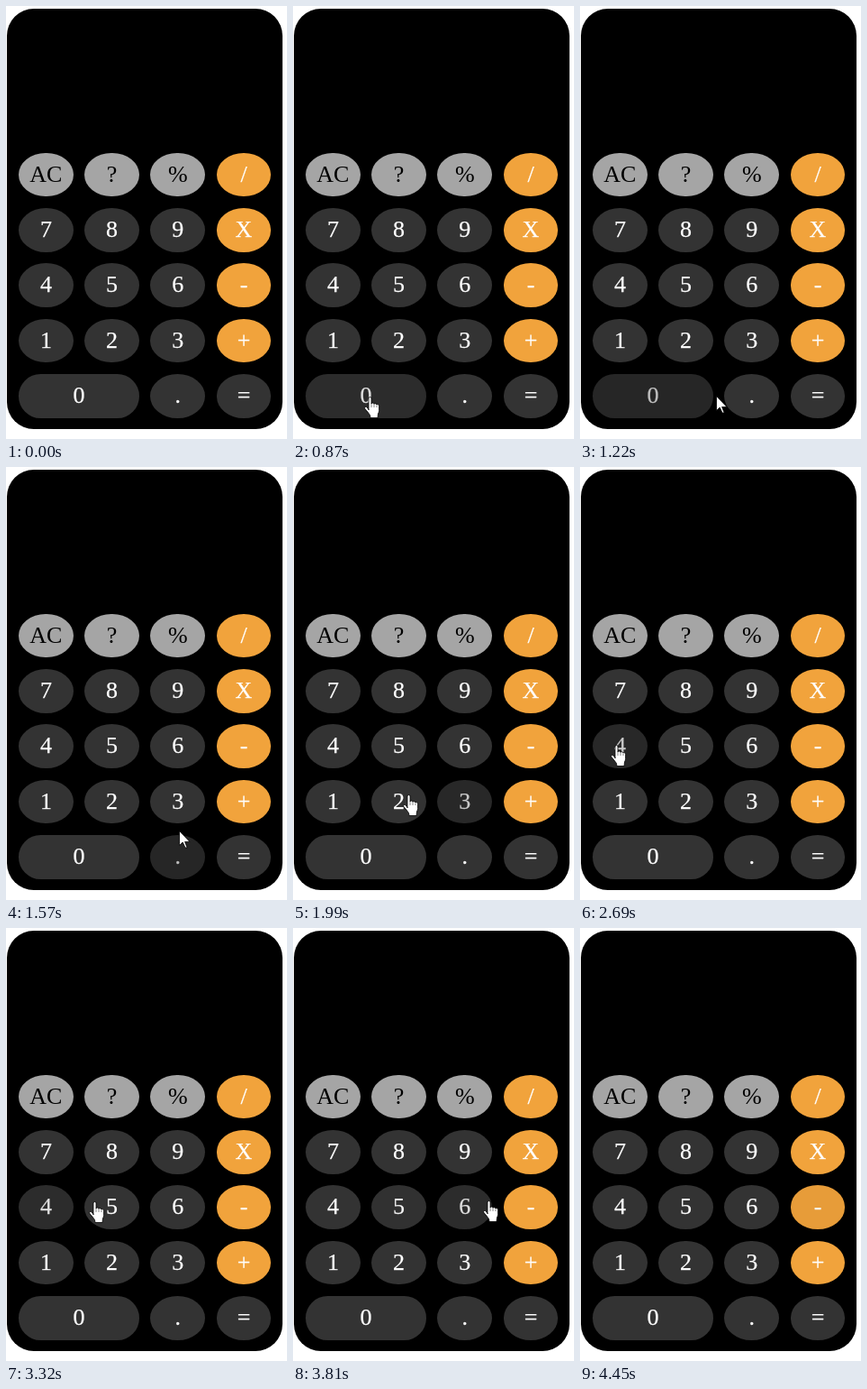
Recreate the animation shown at these times as an HTML page. Size 312 by 480 pixels, loop 4.72 s.

```html
<!DOCTYPE html>
<html lang="en">
<head>
<meta charset="utf-8">
<title>Calculator</title>
<style>
  html, body { margin: 0; width: 100%; height: 100%; overflow: hidden; background: #fff; }
  #calc {
    position: absolute; left: 1px; top: 3px; width: 306px; height: 466px;
    border-radius: 30px; background: #000;
  }
  .key {
    position: absolute; text-align: center;
    font-family: "Liberation Serif", "Times New Roman", serif; font-size: 26px;
    color: #fff; background: #333; -webkit-text-stroke: .25px;
  }
  .light { color: #000; background: #a5a5a5; -webkit-text-stroke: 0; }
  .orange { background: #f1a33c; }
  #pointer { position: absolute; left: 0; top: 0; width: 312px; height: 480px; }
  #pointer path { fill: #fff; stroke: #000; stroke-width: .8; stroke-linejoin: round; }
</style>
</head>
<body>
<div id="calc"></div>
<svg id="pointer" viewBox="0 0 312 480">
  <path id="arrow" d="M.5 .5V16.5L4.2 13L7 19H9.2L6.6 12.4H12Z"/>
  <g id="hand">
    <path d="M5 15V2Q5 .5 6.5 .5T8 2V8Q8.2 7 9.4 7T11 8.4Q11.2 7.7 12.4 7.7T14 9.2Q14.2 8.6 15.2 8.6T16.6 10.2V15.5Q16.6 17 15.5 19L15 23.5H7L6.5 20.5Q4 17 1 13.6Q0 12 1.2 11.4Q2.6 11 4 13L5 14.5Z"/>
    <path d="M8 8V12M11 9V12M14 10V12" opacity=".6"/>
  </g>
</svg>
<script>
const LOOP = 4720, START = 660, END = 4450, STEP = 70;
const FADE = 280, DIM = 0.25;
const KEY_W = 60.8, KEY_H = 48.8, PITCH_X = 73.2, PITCH_Y = 61.3;

const [calc, pointer, arrow, hand] =
  ['calc', 'pointer', 'arrow', 'hand'].map(id => document.getElementById(id));
const keys = [];

function addKey(label, col, row, span = 1) {
  const w = KEY_W + (span - 1) * PITCH_X, h = KEY_H;
  const x = 13 + col * PITCH_X, y = 159.6 + row * PITCH_Y;
  const rx = span > 1 ? h / 2 : w / 2;
  const el = document.createElement('div');
  el.className = 'key' + (col === 3 && row < 4 ? ' orange' : row === 0 ? ' light' : '');
  el.textContent = label;
  Object.assign(el.style, {
    left: x + 'px', top: y + 'px', width: w + 'px', height: h + 'px',
    lineHeight: h + 'px', borderRadius: `${rx}px / ${h / 2}px`
  });
  calc.append(el);
  keys.push({
    el, rx, ry: h / 2, flat: w / 2 - rx,
    cx: calc.offsetLeft + x + w / 2, cy: calc.offsetTop + y + h / 2
  });
}

['AC ? % /', '7 8 9 X', '4 5 6 -', '1 2 3 +'].forEach((line, row) =>
  line.split(' ').forEach((label, col) => addKey(label, col, row)));
addKey('0', 0, 4, 2);
addKey('.', 2, 4);
addKey('=', 3, 4);

// The pointer tip travels along curves, one point per step
const tips = [[107, 457]];

function glide(steps, via, to) {
  const from = tips[tips.length - 1];
  for (let n = 1; n <= steps; n++) {
    const k = n / steps, r = 1 - k;
    tips.push(from.map((v, i) => r * r * v + 2 * r * k * via[i] + k * k * to[i]));
  }
}

function rest() {
  tips.push(tips[tips.length - 1]);
}

glide(8, [49, 413], [151, 432]);
glide(8, [211, 430], [183, 360]);
glide(8, [110, 368], [45, 358]);
glide(8, [37, 298], [44, 303]);
rest();
glide(8, [88, 303], [132, 304]);
glide(8, [244, 300], [252, 305]);
glide(4, [222, 290], [222, 464]);

function hits(key, [x, y]) {
  const dx = Math.max(0, Math.abs(x - key.cx) - key.flat) / key.rx;
  const dy = (y - key.cy) / key.ry;
  return dx * dx + dy * dy <= 1;
}

// One state per step: tip, hovered key and the fade level of every key
const idle = { tip: null, hovered: null, levels: keys.map(() => 0) };

function advance(prev, tip) {
  const levels = prev.levels.map((v, i) => {
    const way = keys[i] === prev.hovered ? 1 : -1;
    return Math.min(1, Math.max(0, v + way * STEP / FADE));
  });
  return { tip, levels, hovered: tip && keys.find(key => hits(key, tip)) };
}

const states = [];
[...tips, null].forEach(tip => states.push(advance(states[states.length - 1] || idle, tip)));

function stateAt(t) {
  if (t < START) return idle;
  if (t >= END) return states[tips.length];
  return states[Math.min(tips.length - 1, Math.floor((t - START) / STEP))];
}

let shown = null;
function show(state) {
  if (state === shown) return;
  shown = state;
  keys.forEach((key, i) => {
    const v = state.levels[i];
    key.el.style.opacity = 1 - DIM * v * v * (3 - 2 * v);
  });
  pointer.style.display = state.tip ? '' : 'none';
  if (!state.tip) return;
  const [x, y] = state.tip.map(Math.round);
  arrow.style.display = state.hovered ? 'none' : '';
  hand.style.display = state.hovered ? '' : 'none';
  arrow.setAttribute('transform', `translate(${x} ${y})`);
  hand.setAttribute('transform', `translate(${x - 7} ${y})`);
}

const begin = performance.now();
function tick() {
  show(stateAt((performance.now() - begin) % LOOP));
  requestAnimationFrame(tick);
}
tick();
</script>
</body>
</html>
```
